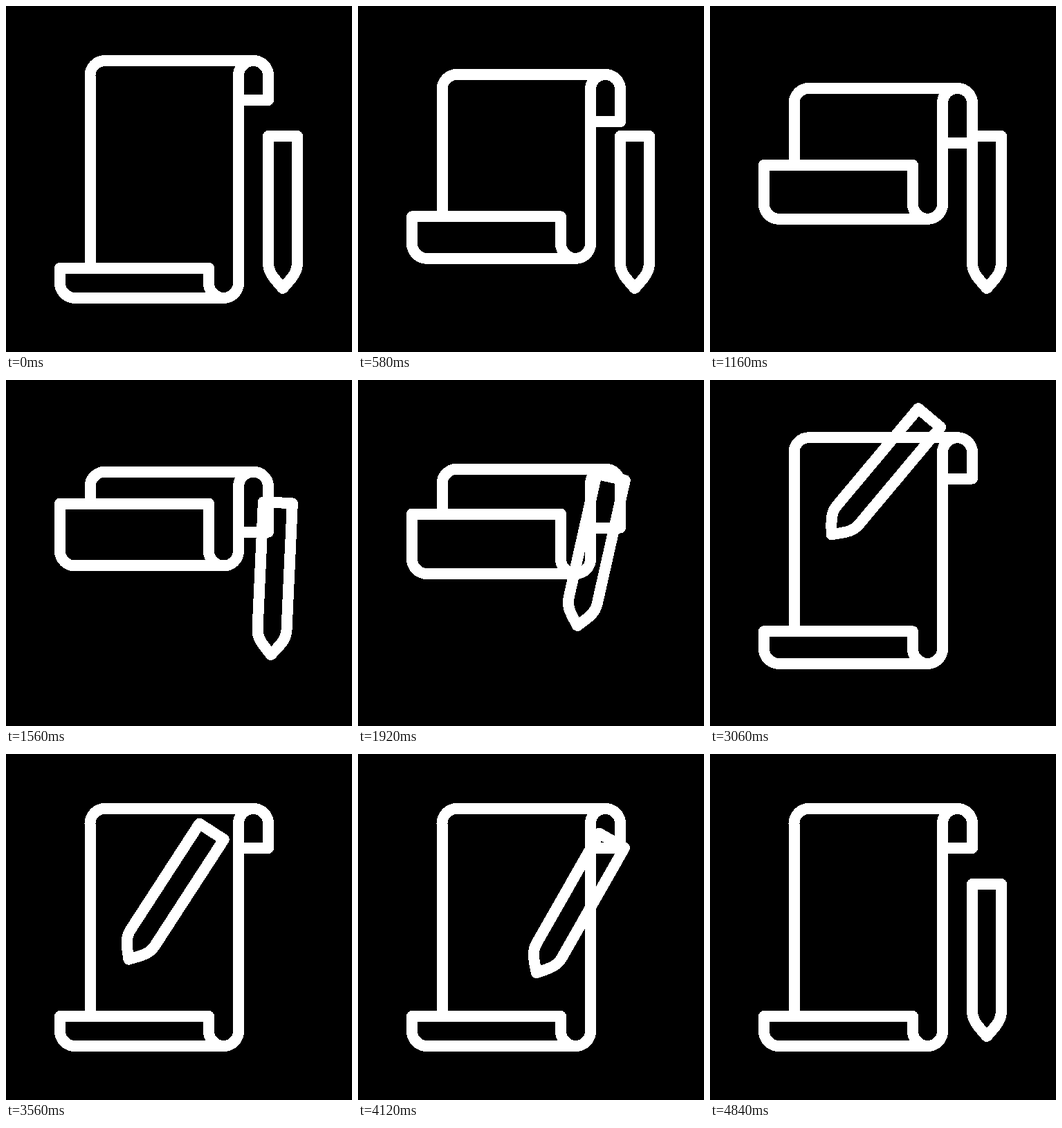
An HTML page that plays this animation: 500 by 500 pixels, repeating every 5 s.

```html
<!DOCTYPE html>
<html lang="en">
<head>
<meta charset="utf-8">
<title>Scroll and pencil</title>
<style>
  html, body { margin: 0; width: 100%; height: 100%; overflow: hidden; background: #000; }
  svg { display: block; width: 100%; height: 100%; }
  path { fill: none; stroke: #fff; stroke-width: 16; stroke-linejoin: round; shape-rendering: crispEdges; }
</style>
</head>
<body>
<svg viewBox="0 0 500 500">
  <path id="sheet"/>
  <path id="pencil" d="M-21 -220H21V-37C21 -22 12 -14 0 0C-12 -14 -21 -22 -21 -37Z"/>
</svg>
<script>
const LOOP = 5000, ROLLED = 1700, UNROLLED = 3167, MAX_ROLL = 218.3;
const sheet = document.getElementById('sheet');
const pencil = document.getElementById('pencil');

// Turning points of the scribble: tip position and tilt in degrees.
const rest = { x: 400, y: 408, tilt: 0 };
const turns = [
  { t: 1467, ...rest },
  { t: 2233, x: 260, y: 318.5, tilt: 21.4 },
  { t: 2567, x: 231, y: 328, tilt: 13.6 },
  { t: 3067, x: 175, y: 222, tilt: 40.3 },
  { t: 3400, x: 150, y: 304, tilt: 33 },
  { t: 3900, x: 235, y: 281, tilt: 33 },
  { t: 4333, x: 280, y: 350, tilt: 26.5 },
  { t: 4840, ...rest }
];

const mix = (a, b, p) => a + (b - a) * p;

function pose(t) {
  const i = turns.findIndex(k => k.t > t);
  if (i < 1) return rest;
  const a = turns[i - 1], b = turns[i];
  const p = (t - a.t) / (b.t - a.t);
  return { x: mix(a.x, b.x, p), y: mix(a.y, b.y, p), tilt: mix(a.tilt, b.tilt, p) };
}

// Rolls up steadily, then back down steadily.
function rollAt(t) {
  const up = t / ROLLED;
  const down = (UNROLLED - t) / (UNROLLED - ROLLED);
  return MAX_ROLL * Math.max(0, Math.min(up, down));
}

function sheetPath(roll) {
  const r = 21.5;
  const top = 79 + roll * 0.268;
  const lip = 136 + roll * 0.418;
  const fold = 379 - roll;
  const base = 422 - roll * 0.766;
  const arc = (dx, dy, sweep) => `a${r} ${r} 0 0 ${sweep} ${dx * r} ${dy * r}`;
  return `M121.5 ${fold}V${top + r}${arc(1, -1, 1)}H357.5${arc(1, 1, 1)}V${lip}H336` +
    `M357.5 ${top}${arc(-1, 1, 0)}V${base - r}${arc(-1, 1, 1)}H99.5` +
    `${arc(-1, -1, 1)}V${fold}H293V${base - r}${arc(1, 1, 0)}`;
}

function draw(t) {
  const { x, y, tilt } = pose(t);
  sheet.setAttribute('d', sheetPath(rollAt(t)));
  pencil.setAttribute('transform', `translate(${x} ${y}) rotate(${tilt})`);
}

const start = performance.now();
function tick(now) {
  draw(Math.max(0, now - start) % LOOP);
  requestAnimationFrame(tick);
}
draw(0);
requestAnimationFrame(tick);
</script>
</body>
</html>
```
